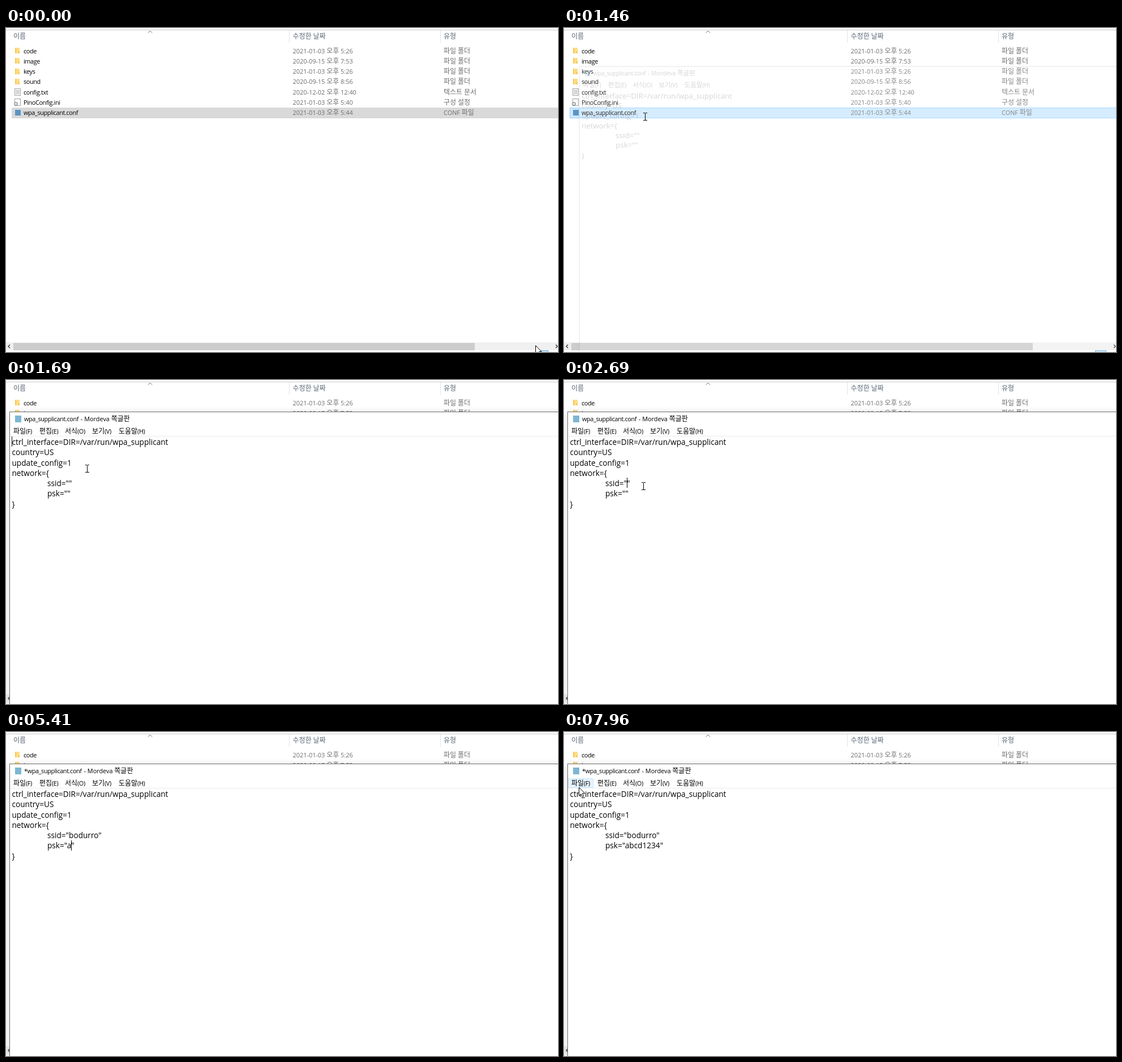
Animation of 975x574 px, one loop 8 s. Source, as an HTML page with a canvas:

```html
<!DOCTYPE html>
<html lang="ko">
<head>
<meta charset="utf-8">
<style>
html, body { margin: 0; width: 100%; height: 100%; overflow: hidden; background: #fff; }
canvas { display: block; }
</style>
</head>
<body>
<canvas id="stage" width="975" height="574"></canvas>
<script>
const ctx = document.getElementById('stage').getContext('2d');
const W = 975, H = 574, LOOP = 8000, STEP = 77.5, BLINK = 530;
const LATIN = '"Open Sans", "Noto Sans", sans-serif';
const HANGUL = '"Noto Sans CJK KR", "Noto Sans CJK", sans-serif';
const UI = 10.9, BODY = 13.63, TIGHT = -0.4;

const FILES = [
  ['folder', 'code', '2021-01-03 오후 5:26', '파일 폴더'],
  ['folder', 'image', '2020-09-15 오후 7:53', '파일 폴더'],
  ['folder', 'keys', '2021-01-03 오후 5:26', '파일 폴더'],
  ['folder', 'sound', '2020-09-15 오후 8:56', '파일 폴더'],
  ['page', 'config.txt', '2020-12-02 오후 12:40', '텍스트 문서'],
  ['gear', 'PinoConfig.ini', '2021-01-03 오후 5:40', '구성 설정'],
  ['note', 'wpa_supplicant.conf', '2021-01-03 오후 5:44', 'CONF 파일']
];
const MENU = [['파일(F)', 13], ['편집(E)', 59], ['서식(O)', 104], ['보기(V)', 152], ['도움말(H)', 199]];
const SSID = 'bodurro', PSK = 'abcd1234';
const SSID_KEYS = [3160, 3540, 3710, 3860, 4090, 4170, 4320];
const PSK_KEYS = [5410, 5640, 6190, 6420, 6730, 6880, 7110, 7340];
const CLICK = 2310, DOWN = 4720, LEFT = 4950;
const CARET_TIMES = [1650, CLICK, ...SSID_KEYS, DOWN, LEFT, ...PSK_KEYS];

const clamp = v => Math.max(0, Math.min(1, v));
const lerp = (a, b, u) => a + (b - a) * u;
const easeQuad = u => u < .5 ? 2 * u * u : 1 - 2 * (1 - u) ** 2;
const easeCubic = u => u < .5 ? 4 * u ** 3 : 1 - 4 * (1 - u) ** 3;
const steps = (t, start, n) => clamp(Math.floor((t - start) / STEP + 1.1) / n);
const typed = (word, keys, t) => word.slice(0, keys.filter(k => k <= t).length);

function rect(x, y, w, h, fill, stroke) {
  ctx.fillStyle = fill;
  ctx.fillRect(x, y, w, h);
  if (!stroke) return;
  ctx.strokeStyle = stroke;
  ctx.lineWidth = 1;
  ctx.strokeRect(x + .5, y + .5, w - 1, h - 1);
}

function poly(points, fill, stroke, width = 1) {
  ctx.beginPath();
  points.forEach(([x, y]) => ctx.lineTo(x, y));
  if (fill) {
    ctx.closePath();
    ctx.fillStyle = fill;
    ctx.fill();
  }
  if (stroke) {
    ctx.strokeStyle = stroke;
    ctx.lineWidth = width;
    ctx.stroke();
  }
}

// Hangul and Latin runs use their own font; returns the end x
function text(str, x, y, color, size = UI, spacing = 0) {
  ctx.fillStyle = color;
  for (const run of str.match(/[가-힣]+|[^가-힣]+/g) || []) {
    const korean = /[가-힣]/.test(run);
    ctx.font = korean ? `${size * 1.1}px ${HANGUL}` : `${size}px ${LATIN}`;
    ctx.letterSpacing = korean ? '0px' : spacing + 'px';
    ctx.fillText(run, x, y);
    x += ctx.measureText(run).width;
  }
  return x;
}

function icon(kind, y) {
  if (kind === 'folder') {
    rect(16, y - 5, 8, 10, '#ffdc83');
    rect(16, y - 5, 2, 10, '#f7c95c');
    rect(22, y + 1, 2, 4, '#f4c659');
  } else if (kind === 'note') {
    rect(16, y - 5, 10, 10, '#5b95c4');
  } else {
    rect(15, y - 6, 11, 13, '#fafafa', '#a3a3a3');
    if (kind === 'page') {
      for (let i = 0; i < 4; i++) rect(17, y - 3 + i * 2, 7, 1, '#b5b5b5');
    } else {
      ctx.beginPath();
      ctx.arc(17.5, y + 3.5, 2.5, 0, 7);
      ctx.fillStyle = '#fff';
      ctx.fill();
      ctx.strokeStyle = '#8b9399';
      ctx.lineWidth = 1.5;
      ctx.stroke();
    }
  }
}

function drawExplorer(hot) {
  rect(0, 0, W, H, '#fff');
  rect(0, 3, W, 1, '#c9c9c9');
  for (const x of [500, 767]) rect(x, 4, 1, 22, '#e3e3e3');
  poly([[251, 8.5], [254.5, 5], [258, 8.5]], null, '#666');
  text('이름', 13, 19, '#596675');
  text('수정한 날짜', 506.5, 19, '#596675');
  text('유형', 773, 19, '#596675');

  if (hot) rect(10, 141, W - 9, 19, '#cce8ff', '#99d1ff');
  else rect(10, 141, W - 10, 19, '#d9d9d9');
  FILES.forEach(([kind, name, date, type], i) => {
    const y = 40.5 + i * 18.25;
    icon(kind, Math.round(y - .3));
    text(name, 31, Math.round(y + 4), '#000', UI, TIGHT);
    text(date, 506.5, Math.round(y + 4), '#6d6d6d');
    text(type, 773, Math.round(y + 4), '#6d6d6d');
  });

  rect(0, 557, W, 14, '#f0f0f0');
  rect(13, 558, 815, 13, '#cdcdcd');
  poly([[7, 561], [4, 564], [7, 567]], null, '#444', 1.5);
  poly([[971, 561], [974, 564], [971, 567]], null, '#444', 1.5);
  rect(938, 571, 20, 4, '#c5e3f6', '#66aed8');
}

// Shadow only around the window, so that it stays clear while fading in
function drawShadow(x, y, w, h) {
  ctx.save();
  ctx.beginPath();
  ctx.rect(-W, -H, W * 4, H * 4);
  ctx.rect(x, y, w, h);
  ctx.clip('evenodd');
  ctx.shadowColor = 'rgba(0,0,0,.16)';
  ctx.shadowBlur = 12;
  ctx.shadowOffsetY = 2;
  rect(x, y, w, h, '#fff');
  ctx.restore();
}

function drawNotepad(t, menuHot) {
  drawShadow(6, 56, W + 200, H + 100);
  rect(6, 56, W + 200, H + 100, '#fff', '#6e6e6e');

  rect(16, 63, 11, 12, '#7db7d3');
  const star = t >= SSID_KEYS[0] ? '*' : '';
  const end = text(star + 'wpa_supplicant.conf', 32, 73, '#000', UI, TIGHT);
  text(' - Mordeva 쪽글판', end + 1, 73, '#000');
  if (menuHot) rect(7, 82, 45, 17, '#e5f3ff', '#cce8ff');
  for (const [label, x] of MENU) text(label, x, 94.5, '#000', UI, TIGHT);
  rect(7, 99, W + 198, 1, '#ececec');

  const ssid = 'ssid="' + typed(SSID, SSID_KEYS, t);
  const psk = 'psk="' + typed(PSK, PSK_KEYS, t);
  const lines = [
    'ctrl_interface=DIR=/var/run/wpa_supplicant', 'country=US',
    'update_config=1', 'network={', ssid + '"', psk + '"', '}'
  ];
  lines.forEach((line, i) => {
    const x = i === 4 || i === 5 ? 73 : 10.5;
    text(line, x, Math.round(115 + i * 18.25), '#000', BODY);
  });
  drawCaret(t, ssid, psk);
}

function drawCaret(t, ssid, psk) {
  const last = CARET_TIMES.filter(k => k <= t).pop();
  if (last === undefined || Math.floor((t - last) / BLINK) % 2) return;
  let row = 0, before = '';
  if (t >= LEFT) [row, before] = [5, psk];
  else if (t >= DOWN) [row, before] = [5, psk + '"'];
  else if (t >= CLICK) [row, before] = [4, ssid];
  ctx.font = `${BODY}px ${LATIN}`;
  ctx.letterSpacing = '0px';
  const x = row ? 73 + ctx.measureText(before).width : 10;
  rect(Math.round(x), Math.round(100 + row * 18.3), 1, 18, '#000');
}

function pointer(t) {
  if (t < 1070) {
    const u = easeCubic(steps(t, 70, 9));
    return [lerp(935, 144, u), lerp(562, 156, u)];
  }
  if (t < 1840) {
    const u = steps(t, 1070, 4);
    return [lerp(144, 143, u), lerp(156, 157, u)];
  }
  if (t < 7500) {
    const u = easeQuad(steps(t, 1840, 9));
    return [lerp(143, 140.5, u), lerp(157, 188, u)];
  }
  const u = easeQuad(steps(t, 7570, 6));
  return [lerp(140.5, 26, u), lerp(188, 97.5, u)];
}

function drawArrow(x, y) {
  const shape = [[0, 0], [0, 15], [3.5, 11.8], [5.8, 16.8], [8.2, 15.8], [6, 10.8], [10.5, 10.8], [0, 0]];
  poly(shape.map(([a, b]) => [x + a + .5, y + b + .5]), '#fff', '#000');
}

function drawBeam(x, y) {
  x = Math.round(x - .5);
  y = Math.round(y);
  rect(x, y - 6, 1, 13, '#000');
  for (const end of [y - 7, y + 6]) {
    rect(x - 3, end, 3, 1, '#000');
    rect(x + 1, end, 3, 1, '#000');
  }
}

function draw(t) {
  const [x, y] = pointer(t);
  const open = steps(t, 1460, 4);
  const menuHot = t > 7500 && y < 99 && x < 52;
  drawExplorer(t >= 1070 || (y >= 141 && y < 160));

  if (open > 0) {
    const scale = 1 - .065 * (1 - open) ** 2;
    ctx.save();
    ctx.globalAlpha = open ** 1.3;
    ctx.translate(575, 380);
    ctx.scale(scale, scale);
    ctx.translate(-575, -380);
    drawNotepad(t, menuHot);
    ctx.restore();
  }

  // The pointer hides while typing
  if (t >= SSID_KEYS[0] && t < 7570 - STEP * .1) return;
  if (t < 1452 || (t > 7500 && y < 100)) drawArrow(x, y);
  else drawBeam(x, y);
}

const start = performance.now();
function tick() {
  draw((performance.now() - start) % LOOP);
  requestAnimationFrame(tick);
}
tick();
</script>
</body>
</html>
```
